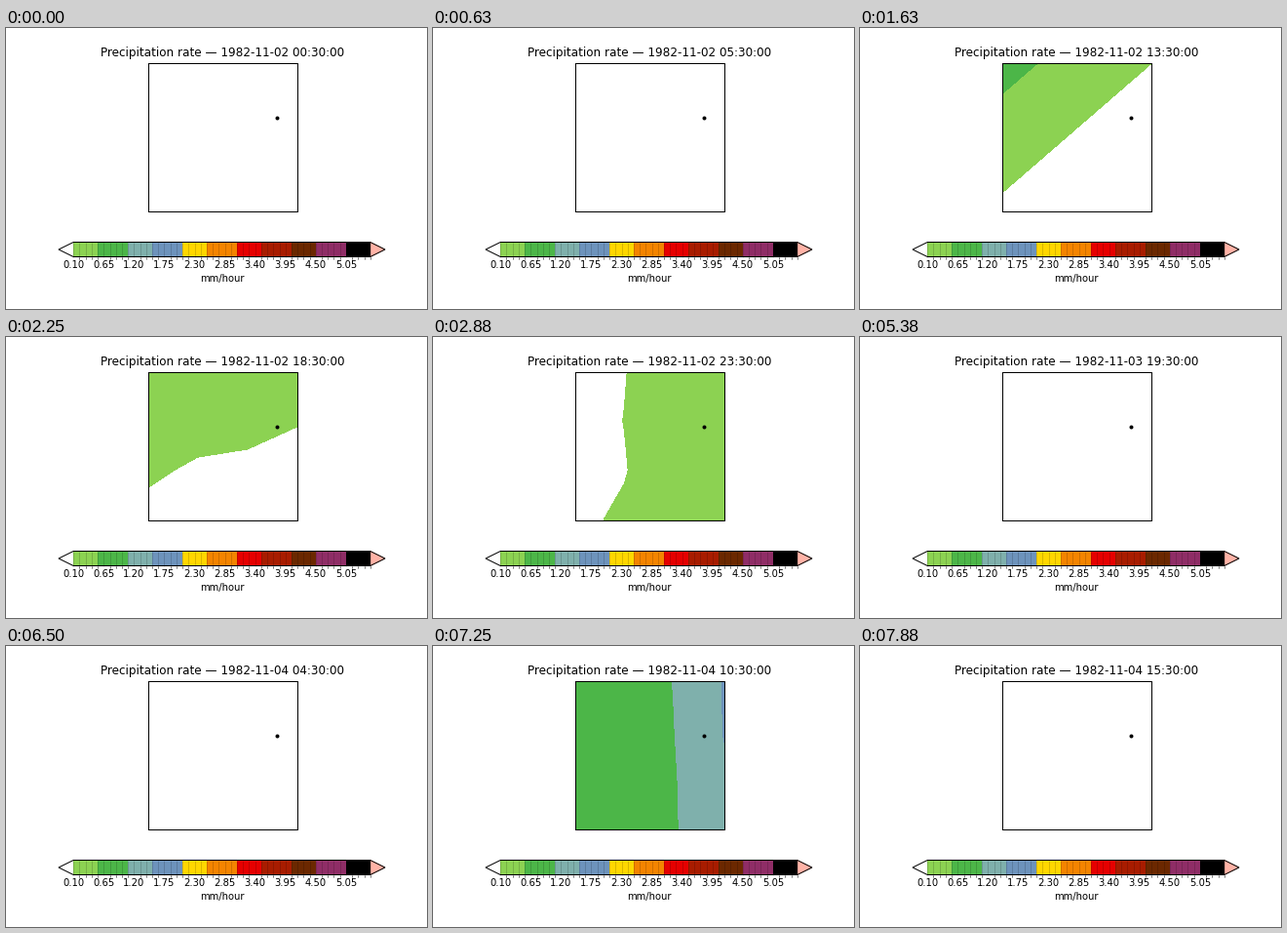
These frames come from a looping animation (432x288 px, 8000 ms). A matplotlib script:

```python
import numpy as np
import matplotlib.pyplot as plt
from matplotlib.animation import FuncAnimation
from matplotlib.cm import ScalarMappable
from matplotlib.colors import BoundaryNorm, ListedColormap

W, H, DPI = 432, 288, 72
HOURS, LOOP_MS = 64, 8000

plt.rcParams.update({"font.family": "DejaVu Sans", "font.size": 10,
                     "axes.linewidth": 1})

# Fine levels share eleven base colours
BASE = ["#8cd252", "#4cb648", "#7fb0ac", "#6d93bc", "#ffd700", "#f48400",
        "#e60000", "#a81c00", "#6b2800", "#8f2d66", "#000000"]
levels = 0.1 + 0.11 * np.arange(50)
cmap = ListedColormap([BASE[int((i + 0.5) / 4.5)] for i in range(49)])
cmap.set_under("white")
cmap.set_over("#ffb3a7")
norm = BoundaryNorm(levels, cmap.N)

# Rain field on a coarse 4 x 4 grid, s to the right and t downwards
s, t = np.meshgrid(np.linspace(0, 1, 4), np.linspace(0, 1, 4))


def plane(c, a=0, b=0):
    return c + a * s + b * t


def grid(*rows):
    return np.array(rows) / 100


dry = plane(-0.02)
nw_front = plane(0.68, -0.575, -0.66)
east_band = grid([0, 9, 28, 40], [-1, 10.4, 28, 40],
                 [1, 8.5, 29, 40], [4.2, 14.2, 28, 40])
se_front = grid([-19.7, 15, 50, 92.5], [1, 40.7, 70.5, 132],
                [16.3, 56.6, 116, 140], [46, 88.8, 150, 150])
west_green = grid([57, 85, 110, 155], [57, 77.5, 108.5, 154],
                  [57, 77, 106, 150], [60, 77, 105, 148])

STORY = [(0, dry), (7, dry), (13, nw_front), (14, nw_front),
         (23, east_band), (28, plane(-0.2, 0.5)), (32, plane(-0.3, 0.5)),
         (35, plane(-0.3, 0.7)), (36, se_front), (42, plane(-0.3, 0.42)),
         (43, dry), (54, dry), (56, plane(-0.5, 0.7)), (58, west_green),
         (62, plane(0.2, -0.3)), (63, dry)]
KEYS = [k for k, _ in STORY]


def field(hour):
    i = min(np.searchsorted(KEYS, hour, side="right") - 1, len(KEYS) - 2)
    (k0, a), (k1, b) = STORY[i], STORY[i + 1]
    f = (hour - k0) / (k1 - k0)
    return (1 - f) * a + f * b


def pixel_axes(x0, y0, x1, y1):
    return fig.add_axes([x0 / W, 1 - y1 / H, (x1 - x0) / W, (y1 - y0) / H])


fig = plt.figure(figsize=(W / DPI, H / DPI), dpi=DPI, facecolor="white")

ax = pixel_axes(145.5, 35.5, 298.5, 187.5)
ax.set(xlim=(0, 1), ylim=(1, 0), xticks=[], yticks=[])
ax.plot((277.5 - 145.5) / 153, (91.5 - 35.5) / 152, "o", color="black",
        ms=4, mew=0, zorder=5)
title = ax.set_title("", fontsize=12, pad=6)

cax = pixel_axes(54, 219.5, 389, 234.5)
bar = fig.colorbar(ScalarMappable(norm, cmap), cax=cax, extend="both",
                   orientation="horizontal", spacing="uniform",
                   ticks=levels[:50:5], drawedges=True)
bar.ax.minorticks_off()
bar.ax.tick_params(length=0, pad=4, labelsize=10)
bar.ax.set_xticks(levels[:50:5], [f"{v:.2f}" for v in levels[:50:5]])
bar.dividers.set(linewidth=0.5, color="black", alpha=0.3)
bar.outline.set_linewidth(1)
fig.text(222 / W, 1 - 260 / H, "mm/hour", ha="center", va="baseline")

rain = None


def update(hour):
    global rain
    if rain is not None:
        rain.remove()
    rain = ax.contourf(s, t, field(hour), levels=levels, cmap=cmap,
                       norm=norm, extend="both", zorder=1)
    title.set_text(f"Precipitation rate — 1982-11-{2 + hour // 24:02d} "
                   f"{hour % 24:02d}:30:00")
    return [title]


anim = FuncAnimation(fig, update, frames=HOURS, interval=LOOP_MS / HOURS,
                     repeat=True, repeat_delay=0, blit=False)
plt.show()
```
